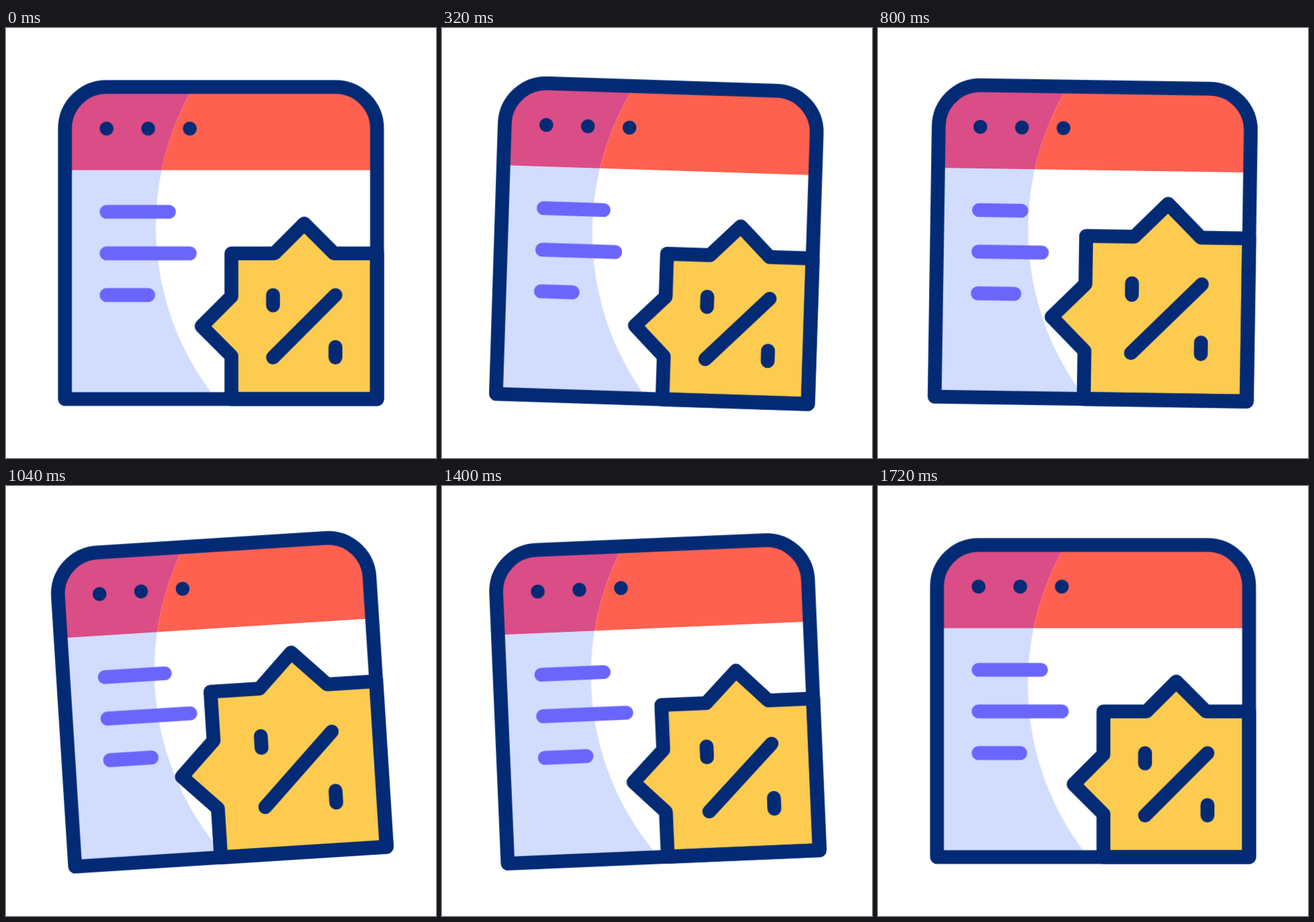
An HTML page for the animation above (1800 ms loop, 640 by 640 pixels).

```html
<!DOCTYPE html>
<html lang="en">
<head>
<meta charset="utf-8">
<title>Discount page icon</title>
<style>
  html, body { margin: 0; width: 100%; height: 100%; overflow: hidden; background: #fff; }
  svg { display: block; width: 100vw; height: 100vh; }

  .window, .badge, .text path {
    animation: 1800ms cubic-bezier(.5, 0, .5, 1) infinite;
  }
  .window { transform-origin: 31px 31px; animation-name: rock; }
  .badge { transform-origin: 53.5px 53.5px; animation-name: swell; }

  .outline, .badge path, .text path {
    fill: none;
    stroke: #032a75;
    stroke-width: 2;
    stroke-linecap: round;
    stroke-linejoin: round;
  }
  /* The badge grows while its line weight stays the same. */
  .badge path { vector-effect: non-scaling-stroke; stroke-width: calc(100vmin / 31); }
  .badge .paper { fill: #fdcb50; }

  .text path {
    stroke: #6b66fb;
    stroke-dasharray: 100 200;
    animation-name: shorten;
    animation-delay: var(--delay);
  }

  @keyframes rock {
    0%, 95.556%, 100% { transform: rotate(0deg); }
    31.852% { transform: rotate(3deg); }
    63.704% { transform: rotate(-4deg); }
  }
  @keyframes swell {
    0%, 21.667%, 92.222%, 100% { transform: scale(1); }
    53.889%, 56.111% { transform: scale(1.14); }
  }
  @keyframes shorten {
    0%, 53.333%, 100% { stroke-dasharray: 100 200; }
    26.667% { stroke-dasharray: 64 200; }
  }
</style>
</head>
<body>
<svg viewBox="0 0 62 62">
  <defs>
    <path id="frame" d="M8.5 53.5V14.5a6 6 0 0 1 6-6h33a6 6 0 0 1 6 6v39z"/>
    <circle id="light" cx="61.6" cy="28.6" r="40"/>
    <clipPath id="inFrame"><use href="#frame"/></clipPath>
    <clipPath id="inLight"><use href="#light"/></clipPath>
  </defs>
  <g class="window">
    <g clip-path="url(#inFrame)">
      <path fill="#d2dcfd" d="M8 8h46v46H8z"/>
      <path fill="#db4d86" d="M8 8h46v12.5H8z"/>
      <use href="#light" fill="#fff"/>
      <path fill="#ff6150" clip-path="url(#inLight)" d="M8 8h46v12.5H8z"/>
    </g>
    <g fill="#032a75">
      <circle cx="14.5" cy="14.5" r="1"/>
      <circle cx="20.5" cy="14.5" r="1"/>
      <circle cx="26.5" cy="14.5" r="1"/>
    </g>
    <g class="text">
      <path pathLength="100" style="--delay: 200ms" d="M14.5 26.5h9"/>
      <path pathLength="100" style="--delay: 120ms" d="M14.5 32.5h12"/>
      <path pathLength="100" style="--delay: 40ms" d="M14.5 38.5h6"/>
    </g>
    <g class="badge">
      <path class="paper" d="M32.5 53.5V47.3L28.2 43l4.3-4.3V32.5h6.2L43 28.2l4.3 4.3h6.2v21z"/>
      <path d="M38.5 47.5l9-9M38.5 38.5V40M47.5 46v1.5"/>
    </g>
    <use href="#frame" class="outline"/>
  </g>
</svg>
</body>
</html>
```
